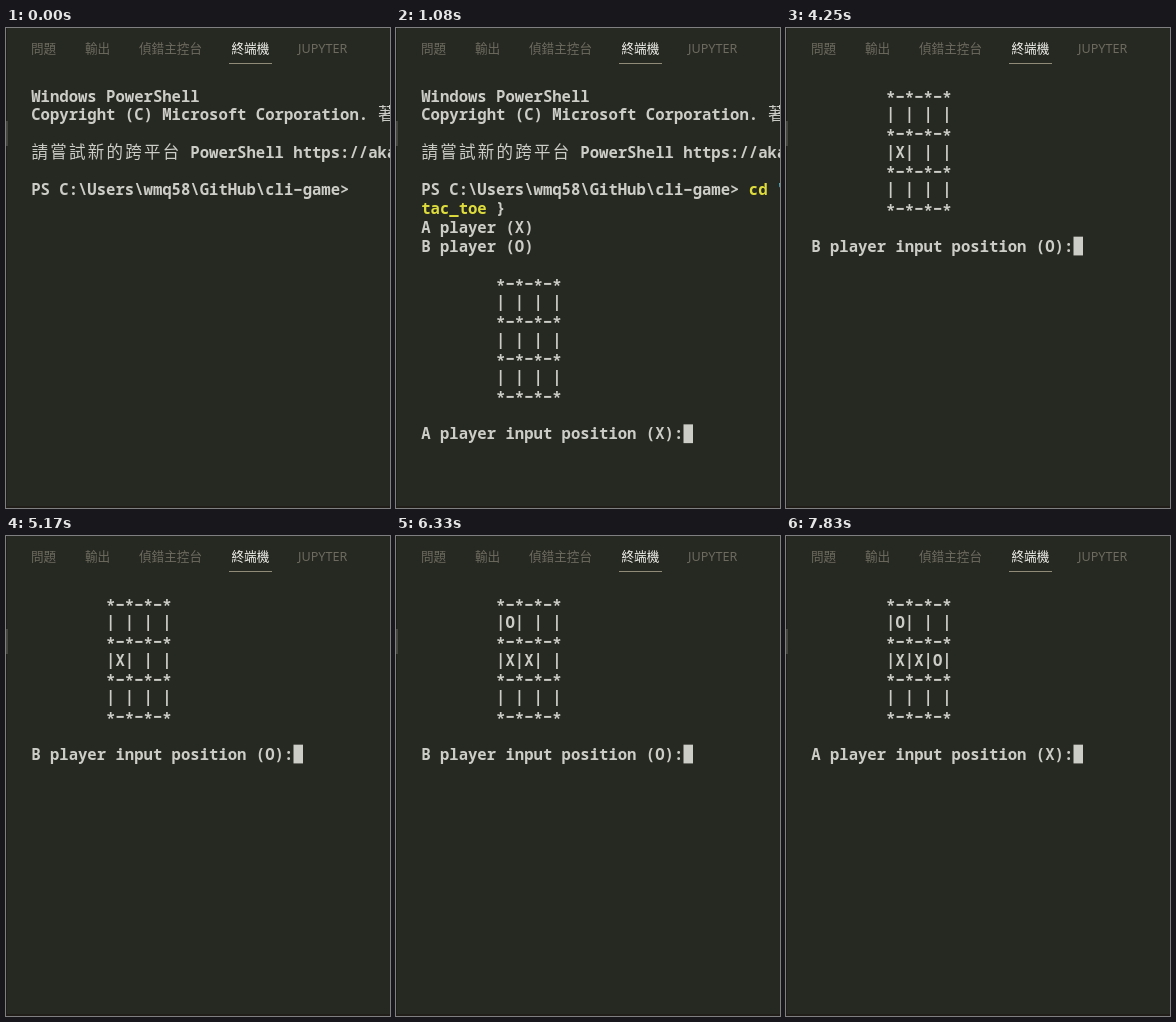
An HTML page with a canvas for the animation above (8000 ms loop, 384 px wide and 480 px high).

```html
<!DOCTYPE html>
<html lang="zh-Hant">
<head>
<meta charset="utf-8">
<title>Terminal tic-tac-toe</title>
<style>
  html, body { margin: 0; width: 100%; height: 100%; overflow: hidden; background: #262822; }
  canvas { display: block; }
</style>
</head>
<body>
<canvas id="stage" width="384" height="480"></canvas>
<script>
const ctx = document.getElementById('stage').getContext('2d');
const LOOP = 8000;
const CELL = 9.36, ROW = 18.77, LEFT = 25, BASE = 73.5;
const TEXT = '#cccdc6', YELLOW = '#dedc3c', CYAN = '#56adbc';
const MONO = '600 15.6px "Noto Sans Mono", "DejaVu Sans Mono", monospace';
const CJK = '400 16.5px "Noto Sans CJK TC", "Noto Sans CJK", sans-serif';
const TAB = '12.6px "Noto Sans", "Noto Sans CJK TC", "Noto Sans CJK", sans-serif';

const TABS = [['問題', 25], ['輸出', 79], ['偵錯主控台', 133], ['終端機', 225.5], ['JUPYTER', 292]];

// Vertical shifts that centre symbols as the terminal face does
const SHIFT = { '*': 1.5, '|': -1 };

// Each move: time, cells from the top left, player who is asked next
const MOVES = [
  [4170, '   X     ', 'B'],
  [5250, 'O  X     ', 'A'],
  [6330, 'O  XX    ', 'B'],
  [6750, 'O  XXO   ', 'A']
];

const baseline = row => BASE + row * ROW;

function write(text, row, col = 0, color = TEXT) {
  ctx.fillStyle = color;
  for (const ch of text) {
    const wide = ch > '\u2e7f';
    const x = LEFT + col * CELL + (wide ? 0.6 : 0.2);
    ctx.font = wide ? CJK : MONO;
    ctx.fillText(ch === '-' ? '−' : ch, x, baseline(row) + (SHIFT[ch] || 0));
    col += wide ? 2 : 1;
  }
}

function frame() {
  ctx.fillStyle = '#262822';
  ctx.fillRect(0, 0, 384, 480);
  ctx.fillStyle = '#1d1e1a';
  ctx.fillRect(0, 0, 1, 480);
  ctx.fillStyle = '#45463f';
  ctx.fillRect(0, 93, 2, 25);
  ctx.fillStyle = '#211d19';
  ctx.fillRect(0, 478, 384, 2);
}

function tabs() {
  ctx.font = TAB;
  for (const [label, x] of TABS) {
    ctx.fillStyle = label === '終端機' ? '#f4f4ee' : '#6d6b5f';
    ctx.fillText(label, x, 25);
  }
  ctx.fillStyle = '#8f8b78';
  ctx.fillRect(223, 35, 43, 1);
}

function board(cells, row) {
  for (let i = 0; i < 4; i++) {
    write('*-*-*-*', row + i * 2, 8);
    if (i < 3) {
      const marks = [...cells.slice(i * 3, i * 3 + 3)];
      write('|' + marks.join('|') + '|', row + i * 2 + 1, 8);
    }
  }
}

function ask(player, row) {
  write(`${player} player input position (${player === 'A' ? 'X' : 'O'}):`, row);
  ctx.fillStyle = TEXT;
  ctx.fillRect(287.5, baseline(row) - 15, 9.5, ROW);
}

function shell(t) {
  write('Windows PowerShell', 0);
  write('Copyright (C) Microsoft Corporation. 著', 1);
  write('請嘗試新的跨平台 PowerShell https://aka', 3);
  write('PS C:\\Users\\wmq58\\GitHub\\cli-game>', 5);
  if (t < 80) return;
  write('cd', 5, 35, YELLOW);
  write('"', 5, 38, CYAN);
  write('tac_toe', 6, 0, YELLOW);
  write('}', 6, 8);
  if (t < 500) return;
  write('A player (X)', 7);
  write('B player (O)', 8);
  board(' '.repeat(9), 10);
  ask('A', 18);
}

function draw(t) {
  frame();
  tabs();
  const move = MOVES.filter(m => t >= m[0]).pop();
  if (!move) return shell(t);
  board(move[1], 0);
  ask(move[2], 8);
}

const start = performance.now();
function tick() {
  draw((performance.now() - start) % LOOP);
  requestAnimationFrame(tick);
}
tick();
</script>
</body>
</html>
```
